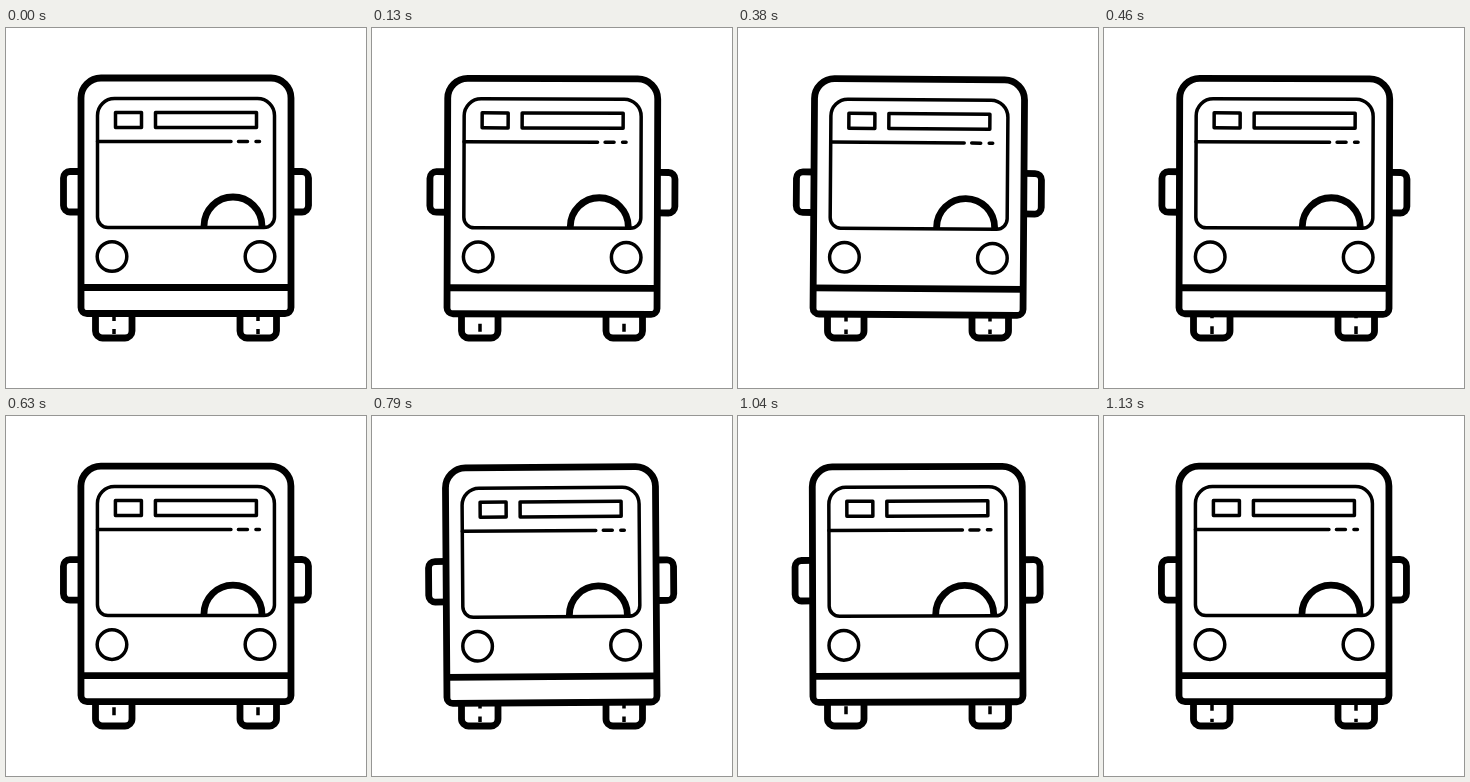
An HTML page that plays this animation: 360x360 px, repeating every 1.18 s.

```html
<!DOCTYPE html>
<html lang="en">
<head>
<meta charset="utf-8">
<title>Bus</title>
<style>
  html, body { margin: 0; width: 100%; height: 100%; overflow: hidden; background: #fff; }
  svg { display: block; width: 100vw; height: 100vh; }
  .bold { stroke-width: 6.8; }
  .fine { stroke-width: 3.5; }
</style>
</head>
<body>
<svg viewBox="0 0 360 360" fill="none" stroke="#000" stroke-linejoin="round">
  <defs>
    <clipPath id="tyres"><path d="M86 285H274V306H86Z"/></clipPath>
  </defs>

  <g class="bold">
    <path d="M89.500 285V303A7 7 0 0 0 96.500 310H119A7 7 0 0 0 126 303V285"/>
    <path d="M234 285V303A7 7 0 0 0 241 310H263.500A7 7 0 0 0 270.500 303V285"/>
  </g>
  <g id="treads" class="fine" stroke-dasharray="8 8" clip-path="url(#tyres)">
    <path d="M108 269V333"/>
    <path d="M252 269V333"/>
  </g>

  <g id="cabin">
    <g class="bold">
      <path d="M75 143.500H64A6.500 6.500 0 0 0 57.500 150V177.500A6.500 6.500 0 0 0 64 184H75"/>
      <path d="M285 143.500H296A6.500 6.500 0 0 1 302.500 150V177.500A6.500 6.500 0 0 1 296 184H285"/>
      <path fill="#fff" d="M75 70A20 20 0 0 1 95 50H265A20 20 0 0 1 285 70V279.500A6 6 0 0 1 279 285.500H81A6 6 0 0 1 75 279.500Z"/>
      <path d="M75 259.500H285"/>
      <path d="M198 200V198A29 29 0 0 1 256 198V200"/>
    </g>
    <g class="fine">
      <path d="M91.500 87.500A17 17 0 0 1 108.500 70.500H251.500A17 17 0 0 1 268.500 87.500V189A10.500 10.500 0 0 1 258 199.500H102A10.500 10.500 0 0 1 91.500 189Z"/>
      <path stroke-linecap="round" d="M91.500 113.500H225M232.500 113.500H241.500M250 113.500H253.500"/>
      <rect x="109.500" y="84.500" width="26" height="15"/>
      <rect x="149.500" y="84.500" width="101" height="15"/>
      <circle cx="106" cy="228.500" r="14.800"/>
      <circle cx="254" cy="228.500" r="14.800"/>
    </g>
  </g>
</svg>
<script>
  const LOOP = 1180;
  const FPS = 24;
  const POSES = 28;
  const cabin = document.getElementById("cabin");
  const treads = document.getElementById("treads");

  // Poses are held at 24 per second, timed to the nearest 10 ms.
  function poseAt(ms) {
    const tick = Math.floor(ms / 10) * 10 + 4.9;
    return Math.min(POSES - 1, Math.floor(tick * FPS / 1000));
  }

  function draw(ms) {
    const phase = poseAt(ms % LOOP) / POSES;
    const sway = Math.sin(phase * 2 * Math.PI) ** 2;
    const side = phase < 0.5 ? 1 : -1;
    cabin.setAttribute("transform",
      `translate(0 ${1.5 * sway}) rotate(${0.5 * side * sway} 180 285)`);
    // Three tread spacings pass upwards per loop.
    treads.setAttribute("stroke-dashoffset", 48 * phase);
  }

  const start = performance.now();
  function loop() {
    draw(performance.now() - start);
    requestAnimationFrame(loop);
  }
  draw(0);
  requestAnimationFrame(loop);
</script>
</body>
</html>
```
